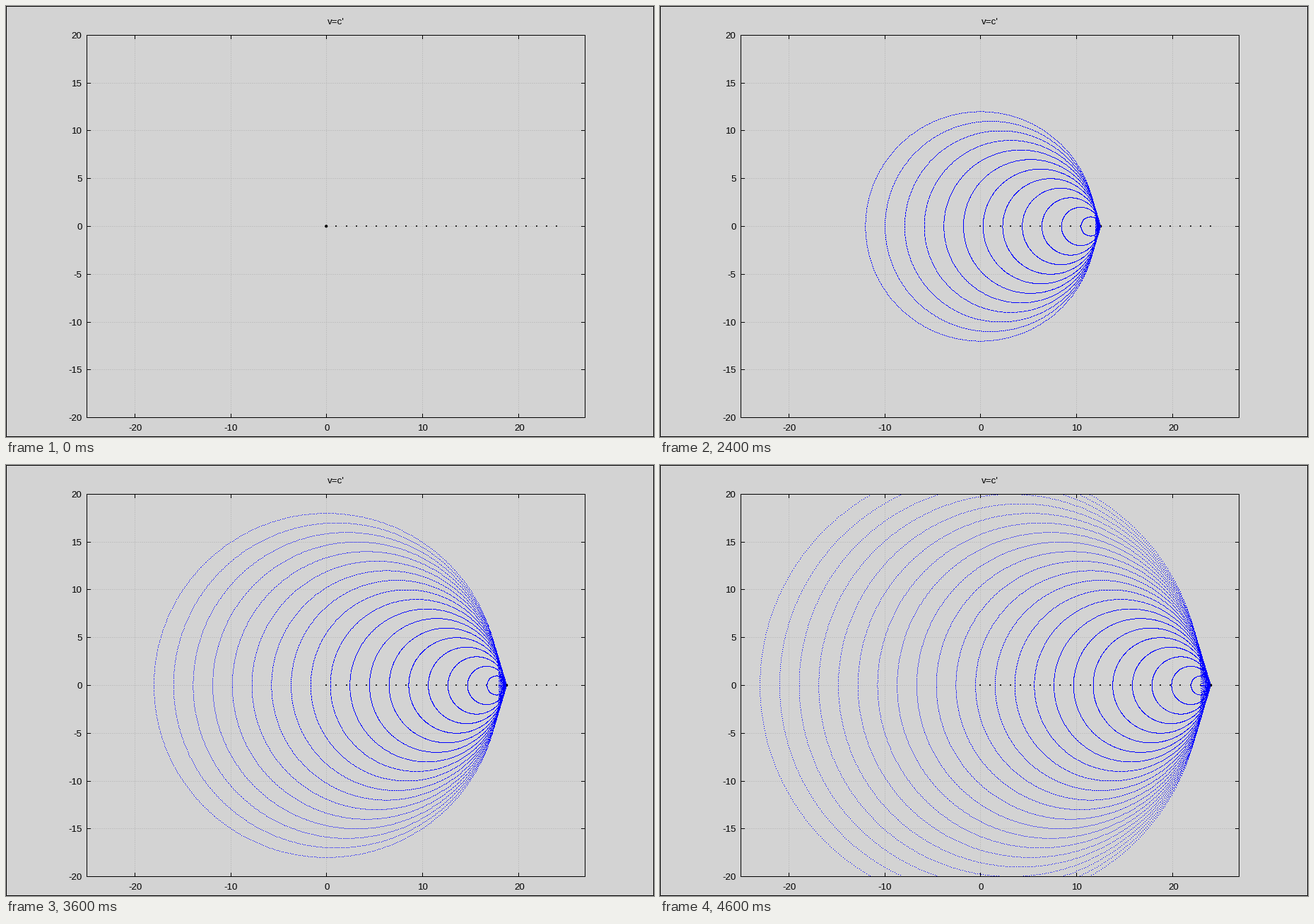
Write a matplotlib script that moves like this. It is 917 px wide and 611 px high and loops after 4800 ms.

```python
import numpy as np
import matplotlib.pyplot as plt
from matplotlib.animation import FuncAnimation
from matplotlib.patches import Circle, Rectangle

W, H, DPI = 917, 611, 64
STEPS, INTERVAL = 24, 200
SPEED = 24 / 23            # source advance per step; waves grow by 1
LEFT, RIGHT, TOP, BOTTOM = 114, 819, 41, 583
PX = 72 / DPI              # one pixel in points

plt.rcParams.update({
    "font.family": "Liberation Sans",
    "font.size": 13.33 * PX,
})


def px(x):
    return np.rint(453.2 + 13.57 * np.asarray(x)).astype(int)


def py(y):
    return np.rint(312 - 13.55 * np.asarray(y)).astype(int)


fig = plt.figure(figsize=(W / DPI, H / DPI), dpi=DPI, facecolor="#d3d3d3")
ax = fig.add_axes([0, 0, 1, 1])
ax.axis("off")


# Lines run through pixel centres, so they stay sharp without snapping.
def line(x0, y0, x1, y1, **style):
    opts = dict(color="black", lw=PX, solid_capstyle="projecting",
                snap=False, zorder=4)
    opts.update(style)
    ax.plot([x0 + .5, x1 + .5], [y0 + .5, y1 + .5], **opts)


def box(x0, y0, x1, y1):
    ax.add_patch(Rectangle((x0 + .5, y0 + .5), x1 - x0, y1 - y0, fill=False,
                           ec="black", lw=PX, snap=False, zorder=4))


def dot(x, radius):
    return ax.add_patch(Circle((x, 312), radius, color="black", lw=0,
                               zorder=2))


def label(x, y, text, ha):
    ax.text(x, y, text, ha=ha, va="baseline", color="black", zorder=5)


grid = dict(color="#b0b0b0", ls=(0, (1, 2)), dash_capstyle="butt", zorder=1)

box(0, 0, W - 1, H - 1)
box(LEFT, TOP, RIGHT, BOTTOM)

for v in range(-20, 21, 10):
    x = int(px(v))
    line(x, BOTTOM, x, TOP, **grid)
    line(x, TOP, x, TOP + 5)
    line(x, BOTTOM, x, BOTTOM - 5)
    label(x + (.5 if v < 0 else 1.5), 602, str(v), "center")

for v in range(-20, 21, 5):
    y = int(py(v))
    if abs(v) < 20:
        line(LEFT, y, RIGHT, y, **grid)
    line(LEFT, y, LEFT + 5, y)
    line(RIGHT, y, RIGHT - 5, y)
    label(107.5, y + 5, str(v), "right")

label(467, 26, "v=c'", "center")

for k in range(STEPS):
    dot(px(k * SPEED), 1)

source = dot(0, 2.1)
waves = ax.imshow(np.zeros((H, W, 4), np.uint8), extent=(0, W, H, 0),
                  interpolation="nearest", aspect="auto", zorder=3)
ax.set_xlim(0, W)
ax.set_ylim(H, 0)

angle = np.arange(0, 2 * np.pi, .01)


def draw(step):
    source.center = (px(step * SPEED) + .2, 312.2)
    born = np.arange(step)[:, None]
    radius = step - born
    x = px(born * SPEED + radius * np.cos(angle))
    y = py(radius * np.sin(angle))
    inside = (x > LEFT) & (x < RIGHT) & (y > TOP) & (y < BOTTOM)
    layer = np.zeros((H, W, 4), np.uint8)
    layer[y[inside], x[inside]] = (0, 0, 255, 255)
    waves.set_data(layer)
    return source, waves


anim = FuncAnimation(fig, draw, frames=STEPS, interval=INTERVAL,
                     repeat=True, repeat_delay=0, blit=False)
plt.show()
```
